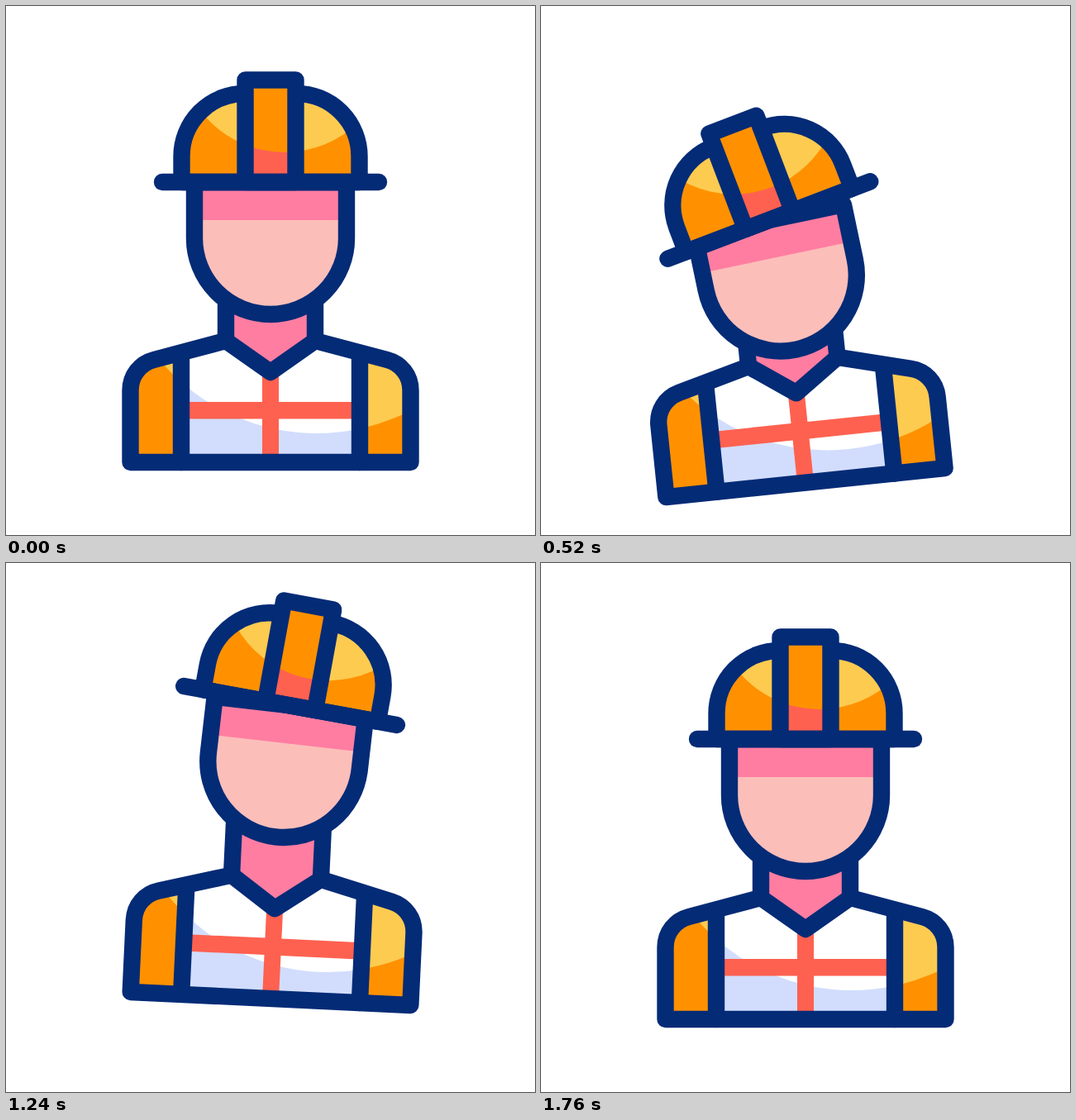
Recreate the animation shown at these times as an HTML page. Size 640 px wide and 640 px high, loop 1.8 s.

```html
<!DOCTYPE html>
<html lang="en">
<head>
<meta charset="utf-8">
<title>Builder</title>
<style>
  html, body { margin: 0; width: 100%; height: 100%; overflow: hidden; background: #fff; }
  svg { display: block; width: 100vw; height: 100vh; }
  .line { fill: none; stroke: #042b76; stroke-width: 20.4; stroke-linecap: round; stroke-linejoin: round; }
  .orange { fill: #ff9100; }
  .yellow { fill: #fdcb50; }
  .red { fill: #ff6150; }
  .pink { fill: #ff7da1; }
  .skin { fill: #fcbeb9; }
  .white { fill: #fff; }
  .shade { fill: #d2ddfd; }
</style>
</head>
<body>
<svg viewBox="0 0 640 640">
  <defs>
    <path id="torso" d="M150.5 552V465C150.5 447 162 432.500 179 428L266 405L320 443L374 405L461 428C478 432.500 489.500 447 489.500 465V552Z"/>
    <path id="dome" d="M212.500 213V182A76 76 0 0 1 288.500 106H351.500A76 76 0 0 1 427.500 182V213Z"/>
    <path id="face" d="M228 213V281A92 92 0 0 0 412 281V213Z"/>
    <path id="band" d="M289.500 213V89.500H350.500V213Z"/>
    <path id="shirt" d="M212 419L266 405L320 443L374 405L428 419V552H212Z"/>
    <circle id="bodyLight" cx="376" cy="269" r="248"/>
    <circle id="hatLight" cx="337" cy="49" r="128"/>
    <clipPath id="inTorso"><use href="#torso"/></clipPath>
    <clipPath id="inShirt"><use href="#shirt"/></clipPath>
    <clipPath id="inDome"><use href="#dome"/></clipPath>
    <clipPath id="inBand"><use href="#band"/></clipPath>
    <clipPath id="inFace"><use href="#face"/></clipPath>
  </defs>

  <g id="body">
    <path class="pink" d="M266 322H374V405L320 443L266 405Z"/>
    <path class="line" d="M266 322V405M374 322V405"/>
    <use href="#torso" class="orange"/>
    <use href="#bodyLight" class="yellow" clip-path="url(#inTorso)"/>
    <use href="#shirt" class="shade"/>
    <use href="#bodyLight" class="white" clip-path="url(#inShirt)"/>
    <path class="red" d="M310 436H330V479H428V499.500H330V552H310V499.500H212V479H310Z"/>
    <use href="#torso" class="line"/>
    <path class="line" d="M212 420V552M428 420V552"/>

    <g id="head">
      <use href="#face" class="skin"/>
      <rect class="pink" x="220" y="205" width="200" height="54" clip-path="url(#inFace)"/>
      <use href="#face" class="line"/>

      <g id="hat">
        <use href="#dome" class="orange"/>
        <use href="#hatLight" class="yellow" clip-path="url(#inDome)"/>
        <use href="#dome" class="line"/>
        <use href="#band" class="red"/>
        <use href="#hatLight" class="orange" clip-path="url(#inBand)"/>
        <use href="#band" class="line"/>
        <path class="line" d="M189 213H451"/>
      </g>
    </g>
  </g>
</svg>
<script>
  const LOOP = 1800;
  const [body, head, hat] = ["body", "head", "hat"].map(id => document.getElementById(id));

  const ease = s => s < 0.5 ? 0.5 * (2 * s) ** 2.3 : 1 - 0.5 * (2 - 2 * s) ** 2.3;

  // Rest, lean left, lean right, rest: eased between the four given times.
  function sway(t, times, left, right) {
    const values = [0, left, right, 0];
    if (t <= times[0] || t >= times[3]) return 0;
    const i = times.findLastIndex(start => t >= start);
    const s = (t - times[i]) / (times[i + 1] - times[i]);
    return values[i] + (values[i + 1] - values[i]) * ease(s);
  }

  function pose(part, angle, pivotY, shift = 0) {
    part.setAttribute("transform", `translate(0 ${shift}) rotate(${angle} 320 ${pivotY})`);
  }

  const bodyTimes = [24, 580, 1093, 1703];
  const headTurnTimes = [10, 450, 1000, 1600];
  const headShiftTimes = [10, 500, 1015, 1605];
  const hatTimes = [70, 600, 1105, 1720];

  function draw() {
    const t = performance.now() % LOOP;
    pose(body, sway(t, bodyTimes, -6, 3), 552, sway(t, bodyTimes, 25, -27.6));
    pose(head, sway(t, headTurnTimes, -6.2, 5.5), 321, sway(t, headShiftTimes, 18, -22.7));
    pose(hat, sway(t, hatTimes, -9.3, 4.1), 213);
    requestAnimationFrame(draw);
  }
  draw();
</script>
</body>
</html>
```
